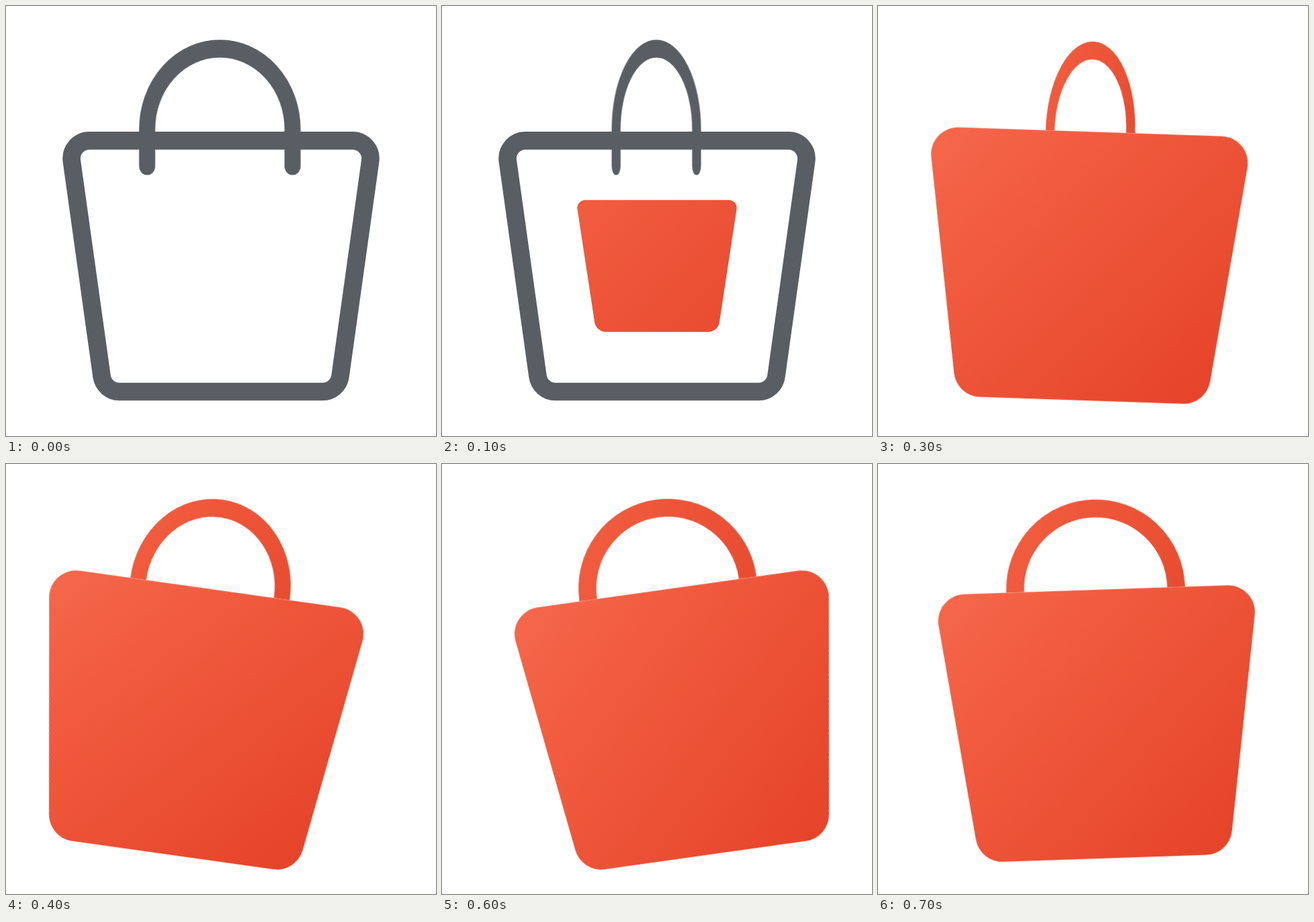
An HTML page that plays this animation: 640 px wide and 640 px high, repeating every 0.8 s.

```html
<!DOCTYPE html>
<html lang="en">
<head>
<meta charset="utf-8">
<title>Shopping bag</title>
<style>
  html, body { margin: 0; width: 100%; height: 100%; overflow: hidden; background: #fff; }
  svg { display: block; width: 100vw; height: 100vh; }
  .outline, .swing, .seed, .full, .loop-grey, .loop-red { animation: 800ms step-end infinite; }
  .outline { animation-name: outline; }
  .seed { animation-name: seed; }
  .full { animation-name: full; }
  .swing { animation-name: swing; transform-origin: 320px 70px; }
  .loop-grey { animation-name: fold; transform-origin: 320px 184px; }
  .loop-red { animation-name: unfold; transform-origin: 320px 186px; }

  @keyframes outline { 0% { visibility: visible } 25%, 100% { visibility: hidden } }
  @keyframes seed { 0% { visibility: hidden } 12.5% { visibility: visible } 25%, 100% { visibility: hidden } }
  @keyframes full { 0% { visibility: hidden } 25%, 100% { visibility: visible } }

  /* the handle flips about its axis: grey closes, red opens the same way */
  @keyframes fold {
    0% { transform: scaleX(.904) }
    12.5% { transform: scaleX(.5) }
    25%, 100% { transform: scaleX(0) }
  }
  @keyframes unfold {
    0%, 25% { transform: scaleX(0) }
    37.5% { transform: scaleX(.5) }
    50% { transform: scaleX(.9) }
    62.5%, 100% { transform: scaleX(1) }
  }
  /* one even swing, right then left, through the middle */
  @keyframes swing {
    0%, 25% { transform: rotate(0deg) }
    37.5% { transform: rotate(1.93deg) }
    50% { transform: rotate(8deg) }
    62.5% { transform: rotate(0deg) }
    75% { transform: rotate(-8deg) }
    87.5%, 100% { transform: rotate(-1.93deg) }
  }
</style>
</head>
<body>
<svg viewBox="0 0 640 640">
  <defs>
    <linearGradient id="bag" gradientUnits="userSpaceOnUse" x1="114" y1="191" x2="500" y2="577">
      <stop offset="0" stop-color="#f5664a"/>
      <stop offset=".35" stop-color="#f0593d"/>
      <stop offset="1" stop-color="#e5442a"/>
    </linearGradient>
    <linearGradient id="grip" gradientUnits="userSpaceOnUse" x1="205" y1="80" x2="435" y2="190">
      <stop offset="0" stop-color="#f15c3f"/>
      <stop offset="1" stop-color="#e94d31"/>
    </linearGradient>
  </defs>

  <g class="outline" fill="none" stroke="#595e64" stroke-width="26.6">
    <path d="M124.2 200.4H515.8A26.7 26.7 0 0 1 542.2 230.7L497.5 551A26.7 26.7 0 0 1 471.2 574H168.8A26.7 26.7 0 0 1 142.5 551L97.8 230.7A26.7 26.7 0 0 1 124.2 200.4Z"/>
    <path class="loop-grey" stroke-linecap="round" d="M198.4 238.3V183.5A119.7 120 0 0 1 437.8 183.5V238.3"/>
  </g>

  <path class="seed" fill="url(#bag)" d="M213 288.8H427A11.7 11.7 0 0 1 438.5 302.4L412.9 470.5A17 17 0 0 1 396 485H244A17 17 0 0 1 227.1 470.5L201.5 302.4A11.7 11.7 0 0 1 213 288.8Z"/>

  <g class="full">
    <g class="swing">
      <path class="loop-red" fill="none" stroke="url(#grip)" stroke-width="26.5" d="M200.2 187.3V186A119.8 119.8 0 0 1 439.8 186V187.3"/>
      <path fill="url(#bag)" d="M124.2 187.3H515.8A40 40 0 0 1 555.4 232.8L510.7 552.8A40 40 0 0 1 471.2 587.3H168.8A40 40 0 0 1 129.3 552.8L84.6 232.8A40 40 0 0 1 124.2 187.3Z"/>
    </g>
  </g>
</svg>
</body>
</html>
```
